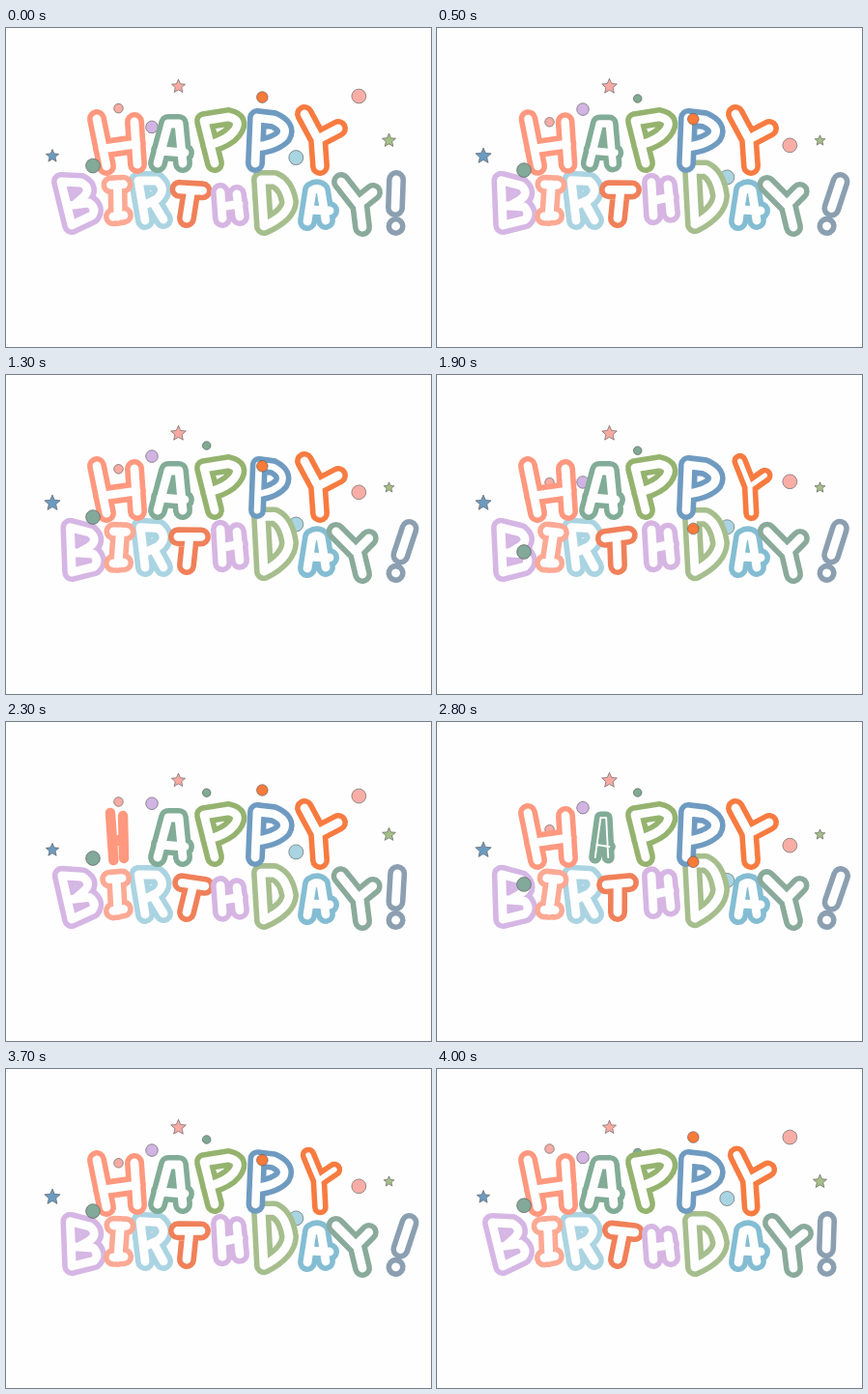
Write an HTML page that moves like this. It is 440 px wide and 330 px high and loops after 4100 ms.

```html
<!DOCTYPE html>
<html lang="en">
<head>
<meta charset="utf-8">
<title>Happy Birthday</title>
<style>
html, body { margin: 0; width: 100%; height: 100%; overflow: hidden; background: #fefefe; }
svg { display: block; width: 440px; height: 330px; }
path { fill: none; stroke-linecap: round; stroke-linejoin: round; vector-effect: non-scaling-stroke; }
.dot { stroke: #555; stroke-width: .6; }
</style>
</head>
<body>
<svg id="stage" viewBox="0 0 440 330" role="img" aria-label="Happy Birthday!"></svg>
<script>
const LOOP = 4100, STEP = 100, BEAT = 800, SPIN = 460;
const STEM = 14.4, LINE = 5.6;
const stage = document.getElementById('stage');
const wave = a => Math.cos(2 * Math.PI * a / BEAT);

function add(parent, tag, attrs) {
  const el = document.createElementNS('http://www.w3.org/2000/svg', tag);
  for (const k in attrs) el.setAttribute(k, attrs[k]);
  return parent.appendChild(el);
}

// Hollow letter: a coloured stroke with a white core; k narrows the stems only
function letter(color, d) {
  const g = add(stage, 'g', {});
  const rim = add(g, 'path', { d, stroke: color });
  const core = add(g, 'path', { d, stroke: '#fefefe' });
  const weigh = k => {
    rim.setAttribute('stroke-width', STEM * k + LINE);
    core.setAttribute('stroke-width', Math.max(0, STEM * k - LINE));
  };
  weigh(1);
  return { g, weigh };
}

const parts = [];

// A ball dropping by amp from y, lowest at time peak of each beat
function ball(color, x, y, r, amp, peak, sharp) {
  const el = add(stage, 'circle', { class: 'dot', cx: x, r, fill: color });
  parts.push(p => {
    const g = Math.pow((1 + wave(p - peak)) / 2, sharp);
    el.setAttribute('cy', (y + amp * g).toFixed(2));
  });
}

function star(color, x, y, r0, r1) {
  let pts = '';
  for (let i = 0; i < 10; i++) {
    const a = Math.PI * (i / 5 - .5), r = i % 2 ? .46 : 1;
    pts += `${(r * Math.cos(a)).toFixed(3)},${(r * Math.sin(a)).toFixed(3)} `;
  }
  const el = add(stage, 'polygon', {
    class: 'dot', points: pts, fill: color, 'vector-effect': 'non-scaling-stroke'
  });
  parts.push((p, s) =>
    el.setAttribute('transform', `translate(${x} ${y}) scale(${r0 + (r1 - r0) * s})`));
}

// Turns about a vertical axis, twice per loop
function spinner(color, cx, start, d) {
  const { g, weigh } = letter(color, d);
  parts.push((p, s, t) => {
    const u = (t % (LOOP / 2) - start) / SPIN;
    const k = u > 0 && u < 1 ? Math.max(.05, Math.abs(Math.cos(Math.PI * u))) : 1;
    weigh(k);
    g.setAttribute('transform', `translate(${cx} 0) scale(${k} 1) translate(${-cx} 0)`);
  });
}

function swayer(color, x, y, angle, d) {
  const { g } = letter(color, d);
  parts.push((p, s) => g.setAttribute('transform', `rotate(${angle(s, p)} ${x} ${y})`));
}

function grower(color, base, grow, d) {
  const { g } = letter(color, d);
  parts.push((p, s) => {
    const k = 1 + grow * s;
    g.setAttribute('transform', `translate(0 ${base * (1 - k)}) scale(1 ${k})`);
  });
}

star('#f8aaa2', 178.5, 60.5, 7.4, 8.3);
star('#6c9bc0', 48, 132.5, 7, 8.6);
star('#a5bf88', 396.5, 116.5, 7.4, 5.6);
ball('#f6aca4', 116.5, 82.5, 4.8, 31, 350, 2);
ball('#d2b4e4', 151, 84, 6.3, 48, 190, 3);
ball('#f8aea6', 365.3, 70.5, 7.4, 58, 425, 1.5);
ball('#a9d4e2', 300.3, 134, 7.5, 30, 390, 2);

swayer('#d5b6e4', 68, 205, s => 12 * s,
  'M57 159L68 204L89 194Q94 187 86 181L64 184M57 159L78 160Q89 166 80 175L72 182');
swayer('#abd4e2', 144, 199, s => 3 * s,
  'M144 199L137 158L156 158Q167 167 156 177L142 184M152 180L163 198');
swayer('#fca994', 116, 196, (s, p) => 1 + 6 * wave(p - 330),
  'M110 162H123M117 162L116 195M111 195L122 194');
swayer('#f08059', 187, 197, (s, p) => 8 * wave(p - 700) - 2,
  'M179 167L203 168M191 168L187 197');
grower('#d6b5e3', 207, .29, 'M222 170L224 197M239 172L242 195M223 185L241 182');
grower('#a6be8d', 215, .19, 'M267 205L264 157L278 157Q290 162 293 180Q292 194 267 205Z');
swayer('#84bdd3', 320, 200, () => 0,
  'M312 200L317 168Q322 165 326 168L331 199M314 188L335 189');
swayer('#8aaa9b', 369, 206, s => -7 * s, 'M347 159L365 182L380 170M366 181L369 206');
swayer('#8b9fb1', 404, 205, s => 17 * s, 'M404 157L403 186M403.5 205L403.6 205');

ball('#7eaa92', 207.7, 73, 4.3, 79, 135, 6);

spinner('#ff987e', 115, 70, 'M94 94L104 143M133 97L136 141M100 125L135 120');
spinner('#82ac97', 171, 440, 'M157 140L168 99H179L183 140M160 127L185 129');
spinner('#95b36f', 222, 790, 'M216 140L205 96L230 92Q245 95 236 107Q229 116 211 121');
spinner('#6f9bc1', 273, 1222, 'M258 140L260 93L277 95Q293 102 287 112Q280 120 260 123');
spinner('#f77b40', 326.5, 1548, 'M309 89L323 115L344 104M323 115L325 143');

ball('#82a99a', 90, 141, 7.4, 42, 300, 2.8);
ball('#fa7a3a', 265.3, 70.5, 5.8, 92, 330, 2.8);

function draw(now) {
  const t = Math.floor(now % LOOP / STEP) * STEP;
  const p = t ? t % BEAT : 50;   // half a step bridges the loop seam
  const h = (1 + wave(p - 410)) / 2;
  const s = h * h * (3 - 2 * h);
  for (const f of parts) f(p, s, t);
}

const begin = performance.now();
function tick() {
  draw(performance.now() - begin);
  requestAnimationFrame(tick);
}
tick();
</script>
</body>
</html>
```
